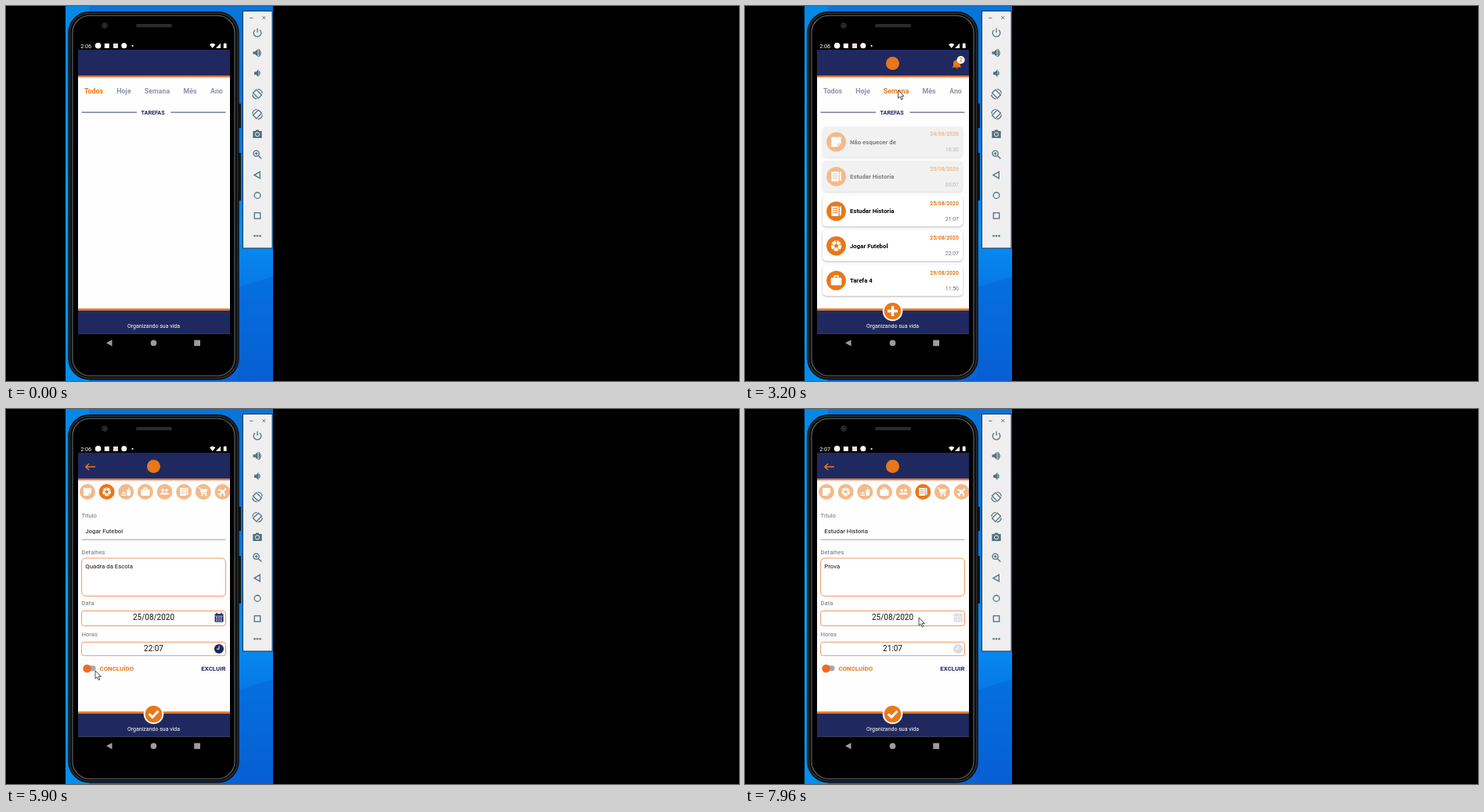
Recreate the animation shown at these times as an HTML page. Size 936 by 480 pixels, loop 8 s.

```html
<!DOCTYPE html>
<html lang="pt">
<head>
<meta charset="utf-8">
<title>Tarefas</title>
<style>
html, body { margin: 0; width: 100%; height: 100%; overflow: hidden; background: #000; }
svg { display: block; width: 936px; height: 480px; font-family: Roboto, Arial, sans-serif; }
.b { font-weight: 700; }
.card > rect { filter: drop-shadow(0 1.2px .8px rgba(0, 0, 0, .28)); }
</style>
</head>
<body>
<svg viewBox="0 0 936 480">
  <defs>
    <linearGradient id="sky" x2="0" y2="1">
      <stop offset="0" stop-color="#0a74d8"/><stop offset=".3" stop-color="#0672de"/>
      <stop offset=".62" stop-color="#088cf2"/><stop offset=".75" stop-color="#0678e4"/><stop offset="1" stop-color="#0862d4"/>
    </linearGradient>
    <linearGradient id="edge" x2="0" y2="1">
      <stop offset="0" stop-color="#0488e4"/><stop offset=".5" stop-color="#02a2f8"/><stop offset="1" stop-color="#028eec"/>
    </linearGradient>
    <clipPath id="screen"><rect x="92" y="56" width="194" height="363.5"/></clipPath>
    <clipPath id="list"><rect x="92" y="91" width="194" height="296.5"/></clipPath>
  </defs>
  <rect width="936" height="480"/>
  <rect x="76" width="265" height="480" fill="url(#sky)"/>
  <rect x="76" width="30" height="480" fill="url(#edge)"/>
  <path d="M296 360L341 346V480H296Z" fill="#0558cc" opacity=".3"/>

  <g id="phone">
    <path d="M297 125h3v31H297zM297 188h3v61H297z" fill="#141414"/>
    <rect x="79.3" y="7" width="218.4" height="471.5" rx="27" fill="#0a0a0a"/>
    <rect x="81.4" y="9.2" width="214.2" height="467" rx="25" fill="none" stroke="#2c2d2e" stroke-width="1.6"/>
    <rect x="85" y="12.3" width="207" height="461" rx="22" fill="#000" stroke="#666769" stroke-width="1.1"/>
    <circle cx="126" cy="25" r="3.3" fill="#1c1c1e" stroke="#343436"/>
    <circle cx="126" cy="25" r="1.2" fill="#3a3a40"/>
    <rect x="166" y="23" width="46" height="4.2" rx="2" fill="#2b2b2b"/>
    <g fill="#fff">
      <text id="clock" x="95.3" y="53.6" font-size="7.2"/>
      <circle cx="117.6" cy="50.8" r="3.8"/>
      <rect x="125.8" y="48" width="6" height="6"/>
      <rect x="137" y="48" width="6" height="6" fill="#f3dcdc"/>
      <circle cx="150.8" cy="50.8" r="3.5"/>
      <circle cx="161.6" cy="51" r="1.1"/>
      <path d="M260 49.3Q263.7 46.3 267.4 49.3L263.7 54ZM268 54L274 47.8V54ZM277.8 48.3h1v-.8h1.8v.8h1V54h-3.8z"/>
    </g>
    <g fill="#9c9c9c">
      <path d="M128 431.3L135.5 427.3V435.4Z"/><circle cx="188.5" cy="431.4" r="3.8"/>
      <rect x="240.2" y="427.6" width="7.8" height="7.6"/>
    </g>
  </g>

  <g id="toolbar">
    <rect x="302.5" y="6.5" width="37.5" height="303.5" fill="#efefef" stroke="#1d3550"/>
    <path d="M311 15.3h4.5M327.3 13l4 4m0-4l-4 4" stroke="#555" stroke-width=".8"/>
    <g fill="none" stroke="#52707e" stroke-width="1.3">
      <path d="M318 30.8a4.8 4.8 0 1 0 6 0M321 28.5v5.5"/>
      <path d="M322.5 57.5q2.2 2.5 0 5M322.5 55.3q5.5 4.7 0 9.8M323 83.5q2.2 2.5 0 5"/>
      <g id="rot">
        <rect x="-4.8" y="-3" width="9.6" height="6" transform="translate(321 112.6) rotate(45)"/>
        <path d="M321.5 106.3a6 6 0 0 1 5.8 5.4M320.5 118.8a6 6 0 0 1-5.8-5.4"/>
      </g>
      <use href="#rot" transform="matrix(-1 0 0 1 642 26)"/>
      <circle cx="319.6" cy="188.8" r="3.6"/><path d="M322.3 191.5l4 4M317.8 188.8h3.6M319.6 187v3.6"/>
      <path d="M317 216.4l7.3-4.2v8.4z"/><circle cx="321" cy="242.4" r="3.9"/><rect x="317.3" y="264.7" width="7.4" height="7.4"/>
    </g>
    <g fill="#52707e">
      <path d="M315.5 58.3h2.6l3.4-3.3v10l-3.4-3.3h-2.6zM317 84.3h2.4l3-3.2v10l-3-3.2H317z"/>
      <path d="M315.3 160h3l1.2-1.6h3l1.2 1.6h3v9h-11.4z"/>
      <circle cx="317.5" cy="294.3" r="1.2"/><circle cx="321" cy="294.3" r="1.2"/><circle cx="324.5" cy="294.3" r="1.2"/>
    </g>
    <circle cx="321" cy="164.3" r="2.6" fill="#52707e" stroke="#efefef"/>
  </g>

  <g id="app" clip-path="url(#screen)"></g>
  <path id="cursor" d="M0 0V10.2L2.4 8.1L4.2 12L5.9 11.2L4.2 7.5H7.4Z" fill="#fff" stroke="#222" stroke-width=".8"/>
</svg>
<script>
const LOOP = 8000, LAST = 7960;
const NAVY = '#20295f', ORANGE = '#e8781a', RED = '#ee6b26';
const $ = id => document.getElementById(id);
const clamp = v => Math.max(0, Math.min(1, v));

const text = (s, x, y, size, fill, opt = '') =>
  `<text x="${x}" y="${y}" font-size="${size}" fill="${fill}" ${opt}>${s}</text>`;
const rect = (x, y, w, h, fill, opt = '') =>
  `<rect x="${x}" y="${y}" width="${w}" height="${h}" fill="${fill}" ${opt}/>`;
const circle = (x, y, r, fill, opt = '') => `<circle cx="${x}" cy="${y}" r="${r}" fill="${fill}" ${opt}/>`;
const path = (d, fill, opt = '') => `<path d="${d}" fill="${fill}" ${opt}/>`;
const line = (d, color, width) => path(d, 'none', `stroke="${color}" stroke-width="${width}"`);
const group = (inner, opt) => `<g ${opt}>${inner}</g>`;
const MID = 'text-anchor="middle"', END = 'text-anchor="end"', BOLD = 'class="b"';

// Rim patch of the ball, repeated around its centre
const patches = [0, 72, 144, 216, 288].map(a =>
  group(path('M-1.6-5.1L0-3.9 1.6-5.1Z', ORANGE) + line('M0-1.8V-4', ORANGE, .6), `transform="rotate(${a})"`)).join('');

// Category icons, drawn around 0,0 on a disc of radius 10
const icons = {
  note: path('M-5-5H5V2L2 5H-5Z', '#fff') + line('M2 5V2H5', ORANGE, .8),
  ball: circle(0, 0, 5.4, '#fff') + path('M0-2.2L2.1-.7 1.3 1.8H-1.3L-2.1-.7Z', ORANGE) + patches,
  food: path('M-6 1.5Q-3-1.5 0 1.5ZM-6 2.4H0V3.2H-6ZM-6 4H0V5H-6ZM.8-2.5H6L5.3 5H1.5ZM3-5.5H4V-2.5H3Z', '#fff'),
  work: rect(-5.5, -3, 11, 8, '#fff', 'rx="1"') + line('M-2-3V-4.7H2V-3', '#fff', 1.2),
  people: circle(-2.4, -2, 1.8, '#fff') + circle(2.4, -2, 1.8, '#fff') +
    path('M-6 3.6Q-5.5.8-2.4.8T0 2Q1 .8 2.4.8T6 3.6Z', '#fff'),
  book: rect(-5, -5, 7.5, 10, '#fff') + line('M-3.7-2.8H1.2M-3.7-.6H1.2M-3.7 1.6H1.2', ORANGE, .8) +
    path('M3.4-5H5.2V3L4.3 5 3.4 3Z', '#fff'),
  cart: path('M-3.8-3.5H5.6L3.8 1H-2.4Z', '#fff') + line('M-6-5H-4.3L-1.8 2.4H4.2', '#fff', 1.1) +
    circle(-1.4, 4.4, 1.1, '#fff') + circle(3.4, 4.4, 1.1, '#fff'),
  plane: path('M-1-6H1V-2L6 1V2.4L1 1V4L2.5 5.2V6H-2.5V5.2L-1 4V1L-6 2.4V1L-1-2Z', '#fff', 'transform="rotate(45)"')
};
const badge = (name, x, y, r, alpha = 1) =>
  group(circle(0, 0, 10, ORANGE) + icons[name], `transform="translate(${x} ${y}) scale(${r / 10})" opacity="${alpha}"`);

const task = (icon, title, date, time, done, details) => ({ icon, title, date, time, done, details });
const soccer = task('ball', 'Jogar Futebol', '25/08/2020', '22:07', false, 'Quadra da Escola');
const history = task('book', 'Estudar Historia', '25/08/2020', '21:07', false, 'Prova');
const all = [
  task('note', 'Não esquecer de', '24/08/2020', '16:30', true),
  task('book', 'Estudar Historia', '25/08/2020', '00:07', true),
  history, soccer,
  task('work', 'Tarefa 4', '29/08/2020', '11:50', false),
  task('note', 'Tarefa 5', '19/09/2020', '11:50', false)
];
const week = all.slice(0, 5);
const afterSave = all.map(t => t === soccer ? { ...t, done: true } : t);

// Each view: start, moment its spinner shows, moment its data shows; fresh views reload their header images
const views = [
  { at: 0, spin: 30, ready: 430, tab: 0, list: all, fresh: true },
  { at: 1700, spin: 1700, ready: 1940, tab: 1, list: [history, soccer] },
  { at: 2620, spin: 2620, ready: 3050, tab: 2, list: week },
  { at: 3560, spin: 3560, ready: 3790, tab: 3, list: week },
  { at: 3960, spin: 3960, ready: 4130, tab: 4, list: all },
  { at: 5030, spin: 5060, ready: 5250, task: soccer, fresh: true },
  { at: 6690, spin: 7080, ready: 7270, tab: 0, list: afterSave, fresh: true },
  { at: 7600, spin: 7630, ready: 7880, task: history, fresh: true }
];
const tabs = [['Todos', 112], ['Hoje', 150.5], ['Semana', 193], ['Mês', 235], ['Ano', 269]];

// time, x, y of the pointer tip
const moves = [
  [1160, 285, 69], [1620, 149, 108], [2000, 149, 108], [2330, 175, 107], [2500, 175, 107],
  [2620, 188, 105], [3300, 196, 108], [3400, 196, 108], [3540, 232, 106], [3800, 232, 106],
  [3940, 265, 101], [4260, 265, 101], [4800, 165, 305], [5100, 165, 305], [5800, 114, 335],
  [6200, 114, 335], [6280, 108, 332], [6540, 188, 390], [6650, 188, 390], [6950, 249, 261],
  [7160, 249, 261], [7450, 222, 267], [LOOP, 222, 267]
];

function pointerAt(t) {
  const i = moves.findIndex(m => m[0] > t);
  if (i < 1) return null;
  const [t0, x0, y0] = moves[i - 1], [t1, x1, y1] = moves[i];
  const p = (t - t0) / (t1 - t0), e = p * p * (3 - 2 * p);
  return [x0 + (x1 - x0) * e, y0 + (y1 - y0) * e];
}

function spinner(t, y) {
  const d = t - 4100, r = 9.5;
  const from = (30 + d * .4) * Math.PI / 180;
  const span = (215 + 75 * Math.sin(d / 212)) * Math.PI / 180;
  const point = a => `${188.5 + r * Math.cos(a)} ${y + r * Math.sin(a)}`;
  const large = span > Math.PI ? 1 : 0;
  return line(`M${point(from)}A${r} ${r} 0 ${large} 1 ${point(from + span)}`, ORANGE, 1.9);
}

function card(item, i) {
  const y = 174 + 44.35 * i;
  return group(
    rect(99, y - 20, 179, 39.5, item.done ? '#e6e6e6' : '#fff', 'rx="5"') +
    badge(item.icon, 116.5, y, 12.4) +
    text(item.title, 134, y + 2.7, 7.8, '#000', BOLD) +
    text(item.date, 273, y - 7.8, 6.9, ORANGE, `${BOLD} ${END}`) +
    text(item.time, 273, y + 12.3, 6.9, '#707070', END),
    `class="card" opacity="${item.done ? .5 : 1}"`);
}

function home(view, t) {
  const labels = tabs.map(([s, x], i) =>
    text(s, x, 112, 8.9, i === view.tab ? ORANGE : '#8f94af', `${BOLD} ${MID}`)).join('');
  const title = line('M96.5 136.1H167M210.3 136.1H280.5', NAVY, .9) +
    text('TAREFAS', 187.6, 138.7, 7.2, NAVY, `${BOLD} ${MID}`);
  let body = '';
  if (t >= view.ready) body = group(view.list.map(card).join(''), 'clip-path="url(#list)"');
  else if (t >= view.spin) body = spinner(t, 163.5);
  return labels + title + body;
}

function calendar() {
  let cells = '';
  for (let i = 0; i < 9; i++) cells += rect(268.3 + i % 3 * 2.8, 266 + Math.floor(i / 3) * 2.2, 1.6, 1.2, '#fff');
  return rect(266.6, 262.3, 11, 10.5, NAVY, 'rx="1"') + line('M269.3 260.8v2.5M274.9 260.8v2.5', NAVY, 1.4) +
    line('M266.6 265H277.6', '#fff', .6) + cells;
}

function form(view, t) {
  if (t < view.ready) return t >= view.spin ? spinner(t, 174) : '';
  const item = view.task;
  const on = item === soccer ? clamp((t - 6280) / 100) : 0;
  const field = (y, h, r) => rect(96.6, y, 183.9, h, '#fff', `rx="${r}" stroke="${RED}" stroke-width=".7"`);
  const label = (s, y) => text(s, 96.5, y, 7.7, '#757575');
  const row = Object.keys(icons).map((name, i) =>
    badge(name, 104 + 24.65 * i, 106, 10, name === item.icon ? 1 : .5)).join('');
  const images = calendar() + circle(272, 307, 6.1, NAVY) + line('M272 303.2V307.2H269', '#fff', 1);
  return row +
    label('Título', 138.9) + text(item.title, 101.3, 159, 7.8, '#111') + line('M96.5 167.2H280.5', '#8a8a8a', .8) +
    label('Detalhes', 186) + field(191, 48.5, 5) + text(item.details, 101.3, 203.8, 7.8, '#111') +
    label('Data', 251) + field(258.5, 19, 3) + text(item.date, 188.5, 269.8, 10, '#111', MID) +
    label('Horas', 291.2) + field(298.4, 17.3, 3) + text(item.time, 188.5, 310.2, 10, '#111', MID) +
    group(images, `opacity="${clamp((t - view.ready - 40) / 250)}"`) +
    rect(100, 328.6, 14.6, 6.8, on > .5 ? '#f5b592' : '#a9a9a9', 'rx="3.4"') +
    circle(103.5 + 8 * on, 332.2, 5.2, RED) +
    text('CONCLUÍDO', 119.5, 335.2, 7.9, ORANGE, BOLD) +
    text('EXCLUIR', 280.6, 335.2, 7.9, NAVY, `${BOLD} ${END}`);
}

function frame(view, t) {
  const shown = view.fresh ? clamp((t - view.at - 30) / 160) : 1;
  const back = view.task ? line('M114 74H102M106 70L101.8 74 106 78', ORANGE, 1.4) : '';
  const button = circle(188.5, 390.5, 12.8, '#fff') + circle(188.5, 390.5, 10.8, ORANGE) + (view.task
    ? line('M182.8 390.3L187 394.5 194.5 386.5', '#fff', 3)
    : line('M182 390.5H195M188.5 384V397', '#fff', 3.4));
  const bell = path('M264.5 78.5L266 76.5V73.5Q266 69.5 270.4 69T274.8 73.5V76.5L276.3 78.5ZM269 79.2H272Q270.5 81.5 269 79.2Z', ORANGE) +
    circle(275.6, 69, 5, '#fff') + text('2', 275.6, 71.4, 6.8, ORANGE, `${BOLD} ${MID}`);
  const bellShown = !view.task && (!view.fresh || t >= view.ready);
  return rect(92, 56, 194, 33.3, NAVY) + rect(92, 89.3, 194, 2, RED) +
    rect(92, 387.2, 194, 2.6, ORANGE) + rect(92, 389.8, 194, 29.7, NAVY) +
    text('Organizando sua vida', 188.5, 412.2, 7, '#fff', MID) +
    group(back + circle(188.5, 73.5, 8.5, ORANGE) + button, `opacity="${shown}"`) +
    (bellShown ? bell : '');
}

function dialog(t) {
  const a = Math.min(clamp((t - 6600) / 90), clamp((7120 - t) / 180));
  if (!a) return '';
  return rect(92, 56, 194, 363.5, '#000', `opacity="${.6 * a}"`) +
    group(rect(104, 195, 169, 85, '#fff', 'rx="1.5"') +
      text('Mensagem', 116, 217, 9.6, '#111', BOLD) +
      text('Tarefa gravada', 116, 232.5, 7.8, '#555') +
      text('OK', 252, 268, 7.2, '#009688', `${BOLD} ${MID}`), `opacity="${a ** 3}"`);
}

function render(t) {
  const view = views.filter(v => v.at <= t).pop();
  $('clock').textContent = t < 5960 ? '2:06' : '2:07';
  $('app').innerHTML = rect(92, 56, 194, 363.5, '#fefefe') +
    (view.task ? form(view, t) : home(view, t)) + frame(view, t) + dialog(t);
  const tip = pointerAt(t);
  $('cursor').setAttribute('visibility', tip ? 'visible' : 'hidden');
  if (tip) $('cursor').setAttribute('transform', `translate(${tip})`);
}

const start = performance.now();
function tick() {
  render(Math.min((performance.now() - start) % LOOP, LAST));
  requestAnimationFrame(tick);
}
tick();
</script>
</body>
</html>
```
